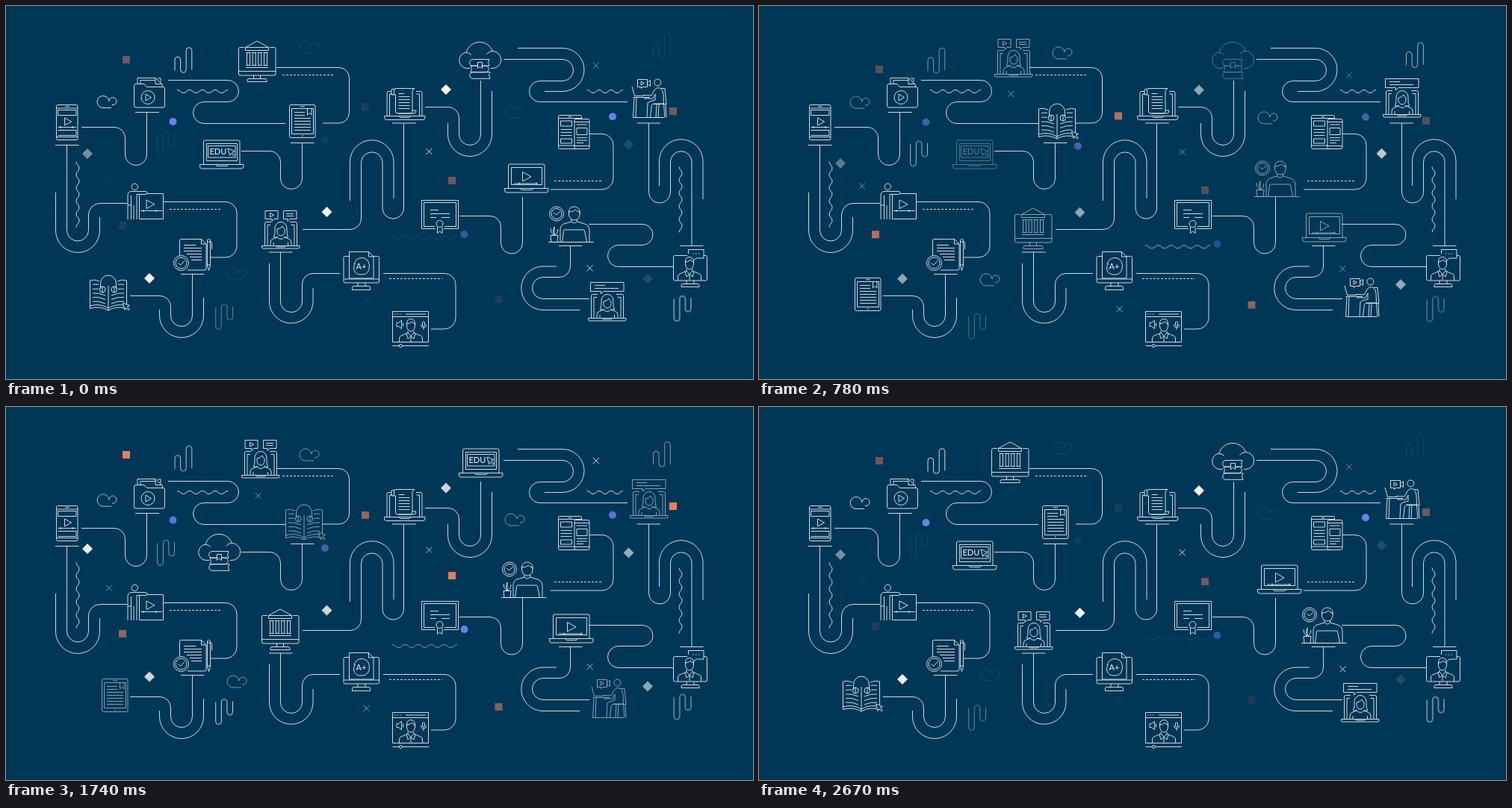
An HTML page for the animation above (2.7 s loop, 1000x500 px).

```html
<!DOCTYPE html>
<html lang="en">
<head>
<meta charset="utf-8">
<title>Online learning</title>
<style>
html, body { margin: 0; width: 100%; height: 100%; overflow: hidden; background: #003756; }
svg { display: block; width: 100%; height: 100%; fill: none; stroke: #f2f7fa; stroke-width: .85; }
.icons { stroke-width: .85; stroke-linejoin: round; }
.solid { fill: #003756; }
.dash { stroke-dasharray: 3 2; }
text { fill: #f2f7fa; stroke: none; font-family: Lato, "Open Sans", sans-serif; }
.sq { fill: #e97f5f; stroke: none; }
.di { fill: #f3f1f1; stroke: none; }
.dot { fill: #6a82e8; stroke: none; }

/* floating bits */
.float, .a, .b { animation: 2.7s linear infinite; }
.drift { animation-name: drift; }
.sink { animation-name: sink; }
.bob { animation-name: bob; }
.sway { animation-name: sway; }
@keyframes drift {
  0%, 98.9%, 100% { transform: translateY(0); opacity: .48; }
  31.5% { transform: translateY(14px); opacity: .36; }
  37.8% { transform: translateY(8.9px); opacity: .45; }
  48.5% { transform: translateY(0); opacity: .76; }
  64.4% { transform: translateY(-8px); opacity: 1; }
  75.6% { transform: translateY(-5.4px); opacity: .87; }
}
@keyframes sink {
  0%, 98.9%, 100% { transform: translateY(0); opacity: .12; }
  20% { transform: translateY(8.5px); opacity: .62; }
  40% { transform: translateY(17px); opacity: 1; }
}
@keyframes bob {
  0%, 98.9%, 100% { transform: translateY(0); opacity: .12; }
  16.5% { transform: translateY(5.3px); opacity: .82; }
  20% { transform: translateY(6px); opacity: .75; }
  37.8% { transform: translateY(9.6px); opacity: .5; }
  49.4% { transform: translateY(12px); opacity: .48; }
  64.4% { transform: translateY(9px); opacity: .58; }
  76.3% { transform: translateY(4px); opacity: .8; }
}
@keyframes sway {
  0%, 98.9%, 100% { transform: translateY(0); opacity: 1; }
  16.5% { transform: translateY(4px); opacity: .48; }
  49.4% { transform: translateY(-5px); opacity: .8; }
}

/* icons that trade places */
.a.early { animation-name: earlyA; }
.b.early { animation-name: earlyB; }
.a.mid { animation-name: midA; }
.b.mid { animation-name: midB; }
.a.late { animation-name: lateA; }
.b.late { animation-name: lateB; }
@keyframes earlyA { 0%, 4%, 82.8%, 100% { opacity: 1; } 15%, 71.7% { opacity: 0; } }
@keyframes earlyB { 0%, 15%, 71.7%, 100% { opacity: 0; } 26%, 60.6% { opacity: 1; } }
@keyframes midA { 0%, 10.4%, 88.9%, 100% { opacity: 1; } 21.5%, 77.8% { opacity: 0; } }
@keyframes midB { 0%, 21.5%, 77.8%, 100% { opacity: 0; } 32.6%, 66.7% { opacity: 1; } }
@keyframes lateA { 0%, 22.2%, 92.2%, 100% { opacity: 1; } 33.3%, 81.1% { opacity: 0; } }
@keyframes lateB { 0%, 33.3%, 81.1%, 100% { opacity: 0; } 44.4%, 70% { opacity: 1; } }
</style>
</head>
<body>
<svg viewBox="0 0 1000 500">
<defs>
  <rect id="sq" class="sq" x="-5" y="-5" width="10" height="10"/>
  <path id="di" class="di" d="M0-7 7 0 0 7-7 0z"/>
  <path id="x" d="M-4-4 4 4M4-4-4 4"/>
  <circle id="dot" class="dot" r="5"/>
  <path id="puff" d="M7 8H-4A8 8 0 1 1 4-1A5 5 0 1 1 8 4"/>
  <path id="pin" d="M-11.5 14V-.5a3.8 3.8 0 0 1 7.6 0V13a3.8 3.8 0 0 0 7.6 0V-13a3.8 3.8 0 0 1 7.6 0V13"/>
  <path id="arrow" class="solid" d="M0 0 9 3.5 5.5 5.2 9 8.5 7.5 10 4.2 6.6 2.6 9.5z"/>
  <path id="col" d="M-3 62.500h6M-2 62.500V79M2 62.500V79M-3 79.500h6"/>

  <g id="lap">
    <path d="M264.500 212V182a2 2 0 0 1 2-2H311a2 2 0 0 1 2 2V212M259.500 212.500H318v2.500q0 3-3 3H262.500q-3 0-3-3zM281 212.500q0 2 2 2h12q2 0 2-2"/>
    <rect x="268.500" y="184.500" width="41" height="23"/>
  </g>
  <g id="woman">
    <path d="M328 59.500H321.500q-2 0-2 2V91M353 59.500h7.500q2 0 2 2V91M327 63.500H323V91M354.500 63.500H359V91"/>
    <path d="M315.500 91.500H366v1.500q0 2-2 2H317.500q-2 0-2-2zM334 91.500l1.500 1.500h11l1.500-1.500"/>
    <path d="M331.500 80q2-4 1.500-12a8 8.500 0 0 1 16 0q-.5 8 1.500 12-3 1-5-1M331.500 80q3 1 5-1M336 69q5-.5 7-4 1 3 3 4v3.500a5 5.500 0 0 1-10 0zM327 91V87q0-4 4-5l5-2q5 5 10 0l5 2q4 1 4 5v4M331 87v4M350.500 87v4"/>
  </g>
  <g id="man">
    <path d="M536.500 427.500V426q0-6.500 5.500-6.500t5.500 6.500v1.500M536.500 426q5-.5 7-3 1 2.500 4 3v3q-1 7-5.500 7t-5.500-7z"/>
    <path d="M526.500 450.500V446q0-4 5-5l6.500-3v-2.500M557.500 450.500V446q0-4-5-5l-6.500-3v-2.500M538 438l4 4.500 4-4.500M536 439l2 7 4-3.500 4 3.500 2-7M542 443v7"/>
  </g>

  <g id="bank">
    <path d="M319 55.500H313.500q-2 0-2 2V91q0 2 2 2H359q2 0 2-2V57.500q0-2-2-2H353M311.500 87.500H361M331.500 93v4M340.500 93v4M323 101.500v-2q0-2 2-2h22q2 0 2 2v2z"/>
    <path d="M320.500 59.500V55.500L336 47l15.500 8.500v4zM320.500 55.500h31M321 82.500h30"/>
    <use href="#col" x="324.500"/><use href="#col" x="332.200"/><use href="#col" x="339.800"/><use href="#col" x="347.500"/>
  </g>
  <g id="talk">
    <use href="#woman"/>
    <path d="M320 44.500h17V55.500h-5l-3 3v-3H320zM326.500 47.500l5 2.700-5 2.700zM344.500 44.500h17.500V55.500h-9l-3 3v-3h-5.500zM348 48.500h10M348 51.500h10"/>
  </g>
  <g id="chat">
    <use href="#woman" x="464" y="327"/>
    <path d="M782.500 370.500H827V382.500H800l-3.500 3.500v-3.500h-14zM788 374.500h14M788 378.500h32"/>
  </g>
  <g id="tablet">
    <rect x="379.500" y="132.500" width="34.500" height="44" rx="2"/>
    <path d="M394 134.800h6M382.500 137.500h29v34h-29zM403.500 137.500v8.500l2.800-2.500 2.700 2.500v-8.500M386 142.500h14M386 146.500h14M386 150.500h22M386 154.500h22M386 158.500h22M386 162.500h22M386 166.500h22M396 174h2"/>
  </g>
  <g id="book">
    <path d="M387 139q-7-3-12.500-1V175.500q13-4 24.500 2.500 11-6.500 24.500-2.500V138q-6-2-12.500 1M399 145v33M374.500 172q13-4 24.500 3 11-7 24.500-3"/>
    <path d="M378 143.500q4-1 8 0M378 149.500q4-1 8 0M378 155q8-1 17 3M378 160.500q9-1 17 3M378 166q9-1 17 3M420 143.500q-4-1-8 0M420 149.500q-4-1-8 0M420 155q-8-1-17 3M420 160.500q-9-1-17 3M420 166q-9-1-17 3"/>
    <path d="M388.500 149V142a10.500 11 0 0 1 21 0V149M391 146q-3.500 0-3.500 4t3.500 4zM407 146q3.500 0 3.500 4t-3.500 4zM391 146q4 0 4 4t-4 4M407 146q-4 0-4 4t4 4"/>
    <use href="#arrow" x="418.500" y="168"/>
  </g>
  <g id="edu">
    <use href="#lap"/>
    <rect x="270.500" y="187.500" width="36.500" height="15.500"/>
    <text x="272.500" y="199" font-size="11">EDU</text>
    <use href="#arrow" x="297" y="191"/>
  </g>
  <g id="cloud">
    <path d="M621 83.500H617A10.700 10.700 0 0 1 616 62.200A18.500 18 0 0 1 651.500 60.500A11.500 11.500 0 0 1 651 83.500H649M616 62.500q4 0 7 3M651.500 60.500q-5 0-8 4"/>
    <path d="M647 71.500H625a4.300 4.300 0 0 0 0 8.700h22q-3-4 0-8.700zM622 80.200h20a4.200 4.200 0 0 1 0 8.500H622q3-4 0-8.500zM648 88.700H625a4.300 4.300 0 0 0 0 8.600h23q-3-4 0-8.600z"/>
    <path class="solid" d="M631.500 75.500v8l3-2.500 3 2.500v-8z"/>
  </g>
  <g id="video">
    <use href="#lap" x="408" y="32"/>
    <path d="M691.500 222.500v12.500l11.500-6.200zM680 238h32M687 236.500v3M710 236.500v3"/>
  </g>
  <g id="desk">
    <circle cx="737" cy="278.500" r="9.500"/><circle cx="737" cy="278.500" r="7"/>
    <path d="M733.500 277l3 3 5-4.500M726 316.500h60.500"/>
    <path d="M729 307.500h10l-1 9h-8zM734 307V296q-3 5 0 11M733 307q-4-3-4-9M735 307q4-2 4-8"/>
    <path d="M753.500 278V275q1-6 7-6t7.500 6v3M753.500 276q6 0 9-3 2 3 5.500 3v4q-1 7-7 7t-7.500-7zM757 286v3l-10 3q-5 2-5 8v16M764.500 286v3l10 3q6 2 6.500 8v16M757 289q3.500 4 7.500 0"/>
    <path class="solid" d="M746.500 301.500q0-1.500 1.500-1.500h25q1.500 0 1.500 1.500l3 15h-33z"/>
  </g>
  <g id="class">
    <path d="M845.500 98.500h13v10h-6l-2 2v-2h-5zM850 101l4.500 2.500-4.500 2.500zM858.500 102.500l4-3v8l-4-3"/>
    <circle cx="872.300" cy="102.500" r="4.500"/>
    <path d="M838 108l3.500 12.500H854M839.500 122.500H862M841 122.500l-1.500 27H881M844 122.500l-1 27"/>
    <path d="M853 119.500l11 .5 4.500-8q3-3.500 7-2 4 2 4.500 8l.5 13H868q-4 0-4 5l-1.500 13M869 118l-3 6H854M869 118v8l-7 2-3 2-1 19"/>
    <path d="M877 110.500h5l2 21h-17M871 131.500l-1 18M874 131.500l-1 18M880.500 131.500l1.500 18M883 131.500l1 18"/>
  </g>
</defs>

<!-- connecting lines -->
<g>
  <path d="M66 186.500h31.500M81.500 186.500V300.500a14.500 14.500 0 0 0 29 0V280a15.500 15.500 0 0 1 15.500-15.500H162M66.500 250V301a29.300 29.300 0 0 0 59 0V283"/>
  <path d="M101 162.500H145a14.500 14.500 0 0 1 14.500 14.500V199a14.500 14.500 0 0 0 29 0V142.500M173 142.500h32"/>
  <path d="M217 99.500h80a14.500 14.500 0 0 1 0 29H265a14.500 14.500 0 0 0 0 29H374"/>
  <path d="M362 82.500h83.500a14 14 0 0 1 14 14V143a14 14 0 0 1-14 14H424"/>
  <path d="M315 194.500h38a14.500 14.500 0 0 1 14.500 14.500V231a14.500 14.500 0 0 0 29 0V183.500M381 183.500h31.500"/>
  <path d="M211 262.500h83a15 15 0 0 1 15 15V322a15 15 0 0 1-15 15H274"/>
  <path d="M166 388.500h40a14.500 14.500 0 0 1 14.500 14.500V415a14.500 14.500 0 0 0 29 0V359.500M234 359.500h31.500M205.500 407v8a29.300 29.300 0 0 0 59 0V391"/>
  <path d="M397 299.500h64A14.500 14.500 0 0 0 475.500 285V209a14.300 14.300 0 0 1 28.500 0V272a14.300 14.300 0 0 0 28.500 0V157.500M517 157h32M460.500 261V209a29.200 29.200 0 0 1 58.500 0v49"/>
  <path d="M561 135.500h31a14.500 14.500 0 0 1 14.500 14.500V172a14.500 14.500 0 0 0 29 0V100M591.500 157v15a29.500 29.500 0 0 0 59 0V114"/>
  <path d="M666 71.500h79a14.500 14.500 0 0 1 0 29H714.500a14 14 0 0 0 0 28H832M685 56.500h60a29 29 0 0 1 0 58H721"/>
  <path d="M844.500 157h31.500M860.500 157V249.500a14.500 14.500 0 0 0 29 0V209a14.200 14.200 0 0 1 28.500 0V321M902 321.500h31.500M874.500 241V208a29.200 29.200 0 0 1 58.500 0v51"/>
  <path d="M893 349.500H820a14.500 14.500 0 0 1 0-29h32a14 14 0 0 0 0-28H780"/>
  <path d="M740 321.500h31.500M755.500 321.500V349a14.500 14.500 0 0 1-14.500 14.500H719a14.500 14.500 0 0 0 0 29h62M737 349H719a29.200 29.200 0 0 0 0 58.500h49"/>
  <path d="M781 171.500h17a15 15 0 0 1 15 15V231a15 15 0 0 1-15 15H729"/>
  <path d="M607 281.500h41a14.500 14.500 0 0 1 14.500 14.500v21.500a14.500 14.500 0 0 0 29 0V256"/>
  <path d="M505 358.500h82a15 15 0 0 1 15 15V418a15 15 0 0 1-15 15H569"/>
  <path d="M352 330h31.500M367.500 330v66a14.500 14.500 0 0 0 29 0V373a14.500 14.500 0 0 1 14.500-14.500H447M352.500 345v51a29.200 29.200 0 0 0 58.500 0V378"/>
  <path class="dash" d="M370 92.500h68M219 272.500h68M734 234.500h64M513 365.500h71"/>
  <path d="M229 112.500c4.200 0 4.200 4 8.500 4s4.200-4 8.500-4 4.200 4 8.500 4 4.200-4 8.500-4 4.200 4 8.500 4 4.200-4 8.500-4 4.200 4 8.500 4 4.200-4 8.500-4M778 112.500c4 0 4 4 8 4s4-4 8-4 4 4 8 4 4-4 8-4 4 4 8 4 4-4 8-4"/>
  <path id="wave" d="M94 208.500c0 4.400 4 4.400 4 8.800s-4 4.400-4 8.800 4 4.400 4 8.800-4 4.400-4 8.800 4 4.400 4 8.800-4 4.400-4 8.800 4 4.400 4 8.800-4 4.400-4 8.800 4 4.400 4 8.800-4 4.400-4 8.800"/>
  <use href="#wave" x="807" y="7"/>
</g>

<!-- fixed icons -->
<g class="icons">
  <rect x="67.500" y="132.500" width="28.500" height="47" rx="2"/>
  <path d="M79 134.700h6M67.500 137h28.500M69.500 139.500h24.500v7H69.500zM78.500 150v10l9-5zM69.500 162.500h24.500M73 161v3M89 161v3M69.500 166.500h24.500v7H69.500M67.500 175.500h28.500"/>

  <path d="M171.500 107q0-2.500 2.500-2.500h11l3.500 4h21.500q2.500 0 2.500 2.500v22.500q0 2.500-2.500 2.500H174q-2.500 0-2.500-2.500zM176 104.500v-8h24l9.500 9v3M180 104V99.500h20M200 96.500v8h9M203 97h4v5"/>
  <circle cx="190" cy="122.500" r="9"/><path d="M187 118v9l7.500-4.500z"/>

  <circle cx="172.300" cy="242.300" r="4.200"/>
  <path d="M163 286V254q0-5.500 5-5.500h18q3 0 3 2t-3 2H175v33.500M163 267h4.500V254M167.500 267v19M171 267v19M178.500 252.500V285.500h32V251.500H189M188 260v11.500l11-5.700zM180 274.500h29M184 273v3M201 273v3"/>

  <path d="M232.500 334V314.500q0-2 2-2h27l6.500 6.500v33q0 2-2 2H243M261.500 312.500v6.500h6.500M238 320.500h16M238 324.500h24M238 328.500h24M242 332.500h20M246 336.500h16M248 340.500h14"/>
  <circle cx="234.500" cy="344.500" r="10"/><circle cx="234.500" cy="344.500" r="7.500"/>
  <path d="M230.500 344.500l3 3 5.500-6M269.500 316v32l2 6.500 2-6.500V316zM269.500 316v-2.500q2-2.500 4 0V316l2 1v9M269.500 347h4"/>

  <path d="M516 114.500h-4q-2 0-2 2V147M549 114.500h6q2 0 2 2V147M513.500 147V118h4M553.500 147V118h-4M506.500 147.500H561v2q0 3-3 3H509.500q-3 0-3-3zM526 147.500l2 2h12l2-2"/>
  <path d="M519.500 119V113q0-2.500 2.500-2.500h25q-3 1-3 4V141q0 3-3 3H524q-2.500 0-2.500-3V119M516.500 119h5M519.500 113q0-2.500-2-2t-1.500 3v5M525.500 117.500h8M525.500 121.500h15M525.500 125.500h15M525.500 129.500h15M525.500 133.500h15M525.500 137.500h15M525 144h21q3 0 3-4h-5"/>

  <path d="M575 298.500H556.500v-38H605.500v38H586"/>
  <path d="M574 295.500H559.500V263.500H602.500V295.500H587M568 273.500h11M568 278.500h26M568 283.500h8M583 283.500h11"/>
  <circle cx="580.500" cy="292" r="4.500"/><path d="M577.500 296v8.500l3-2.500 3.500 2.500V296"/>

  <path d="M459 335.500h-5q-2 0-2 2V369q0 2 2 2h43.500q2 0 2-2V337.500q0-2-2-2H492M459.500 365V329.500h26l6.500 6.500v29zM485.500 329.500v6.500h6.500M452.500 366h47M471 371v4.500M481 371v4.500M463.500 380.500v-3q0-2 2-2h20q2 0 2 2v3z"/>
  <path d="M466 346q2-8 10-8.500 9 0 10.500 10 0 12-9 12.500-11 1-12-8 0-4 2-7"/>
  <text x="468.500" y="353" font-size="11">A+</text>

  <path d="M517.500 409.500h48v41h-48zM517.500 416.500h48M520 413h1.500M523.500 413h1.500M527 413h1.500M535 413h27M517.500 455.500h9M530 455.500h36"/>
  <circle cx="528.300" cy="455.500" r="2"/>
  <path d="M523 424.500h2.500l4-3v11l-4-3H523zM531.500 424.500v5M557.500 424q1.500-3 3 0v4q-1.500 2.500-3 0zM555.500 427q0 4 3.500 4t3.500-4M559 431v3"/>
  <use href="#man"/>

  <rect x="739.500" y="146.500" width="31" height="45" rx="2"/>
  <path d="M739.500 150.500h31M739.500 187h31M742.500 154h15v7h-15zM742.500 165.500h15M742.500 169.500h15M742.500 173.500h15M742.500 178h15v6h-15zM753 148.500h4"/>
  <rect class="solid" x="761" y="151.500" width="20" height="40" rx="2"/>
  <path d="M761 155.500h20M761 187.500h20M764 159h14M764 163.500h14v9h-14zM764 176.500h14M764 180h14M764 183.500h9"/>

  <path d="M912 334.500H895.500q-2 0-2 2V366q0 2 2 2H936.500q2 0 2-2V336.500q0-2-2-2H934M911 368v4.500M921 368v4.500M904 376.500v-2q0-2 2-2h20q2 0 2 2v2z"/>
  <path d="M913.500 332v-5.500H934V338H924l-3 3M919 332h1.500M923 332h1.500M927 332h1.500"/>
  <use href="#man" x="373" y="-83"/>
</g>

<!-- trading icons -->
<g class="icons">
  <g class="a early">
    <use href="#tablet"/>
    <use href="#book" x="-262" y="230"/>
    <use href="#class"/>
    <use href="#chat"/>
  </g>
  <g class="b early">
    <use href="#book"/>
    <use href="#tablet" x="-251" y="232"/>
    <use href="#chat" x="56" y="-273"/>
    <use href="#class" x="-54" y="267"/>
  </g>
  <g class="a mid">
    <use href="#bank"/>
    <use href="#talk" x="27" y="230"/>
    <use href="#video"/>
    <use href="#desk"/>
  </g>
  <g class="b mid">
    <use href="#talk"/>
    <use href="#bank" x="31" y="224"/>
    <use href="#desk" x="-63" y="-61"/>
    <use href="#video" x="60" y="66"/>
  </g>
  <g class="a late">
    <use href="#edu"/>
    <use href="#cloud"/>
  </g>
  <g class="b late">
    <use href="#cloud" x="-349" y="122"/>
    <use href="#edu" x="347" y="-124"/>
  </g>
</g>

<!-- floating bits -->
<g class="float drift">
  <use href="#sq" x="161" y="72"/><use href="#sq" x="597" y="234"/><use href="#sq" x="893" y="141"/>
  <use href="#di" x="109" y="198"/><use href="#x" x="790" y="80"/><use href="#dot" x="613.500" y="306"/>
  <use href="#pin" transform="translate(292 416.500) rotate(180)"/>
</g>
<g class="float sink">
  <use href="#sq" x="481" y="135"/><use href="#sq" x="156" y="294"/>
  <use href="#di" x="833.500" y="185.500"/><use href="#x" x="482.500" y="394"/>
  <use href="#pin" transform="translate(214 185.500) rotate(180)"/><use href="#pin" x="878" y="53.500"/>
  <path d="M517 308.500c4.400 0 4.400 4 8.700 4s4.400-4 8.700-4 4.400 4 8.700 4 4.400-4 8.700-4 4.400 4 8.700 4 4.400-4 8.700-4 4.400 4 8.700 4 4.400-4 8.700-4 4.400 4 8.700 4 4.400-4 8.700-4"/>
</g>
<g class="float bob">
  <use href="#sq" x="659.500" y="393"/><use href="#di" x="859" y="365.500"/>
  <use href="#x" x="337.500" y="110"/><use href="#x" x="138" y="233.500"/><use href="#dot" x="427" y="180"/>
  <use href="#puff" x="405" y="55"/><use href="#puff" x="680" y="142"/><use href="#puff" x="308" y="359"/>
</g>
<g class="float sway">
  <use href="#di" x="589" y="112"/><use href="#di" x="429.500" y="276"/><use href="#di" x="192" y="365"/>
  <use href="#x" x="566.500" y="195"/><use href="#x" x="781.500" y="351.500"/>
  <use href="#dot" x="223.500" y="155"/><use href="#dot" x="812" y="148.300"/>
  <use href="#puff" x="134" y="128.500"/>
  <use href="#pin" x="237.500" y="72.500"/><use href="#pin" transform="translate(905.500 405.500) rotate(180)"/>
</g>
</svg>
</body>
</html>
```
